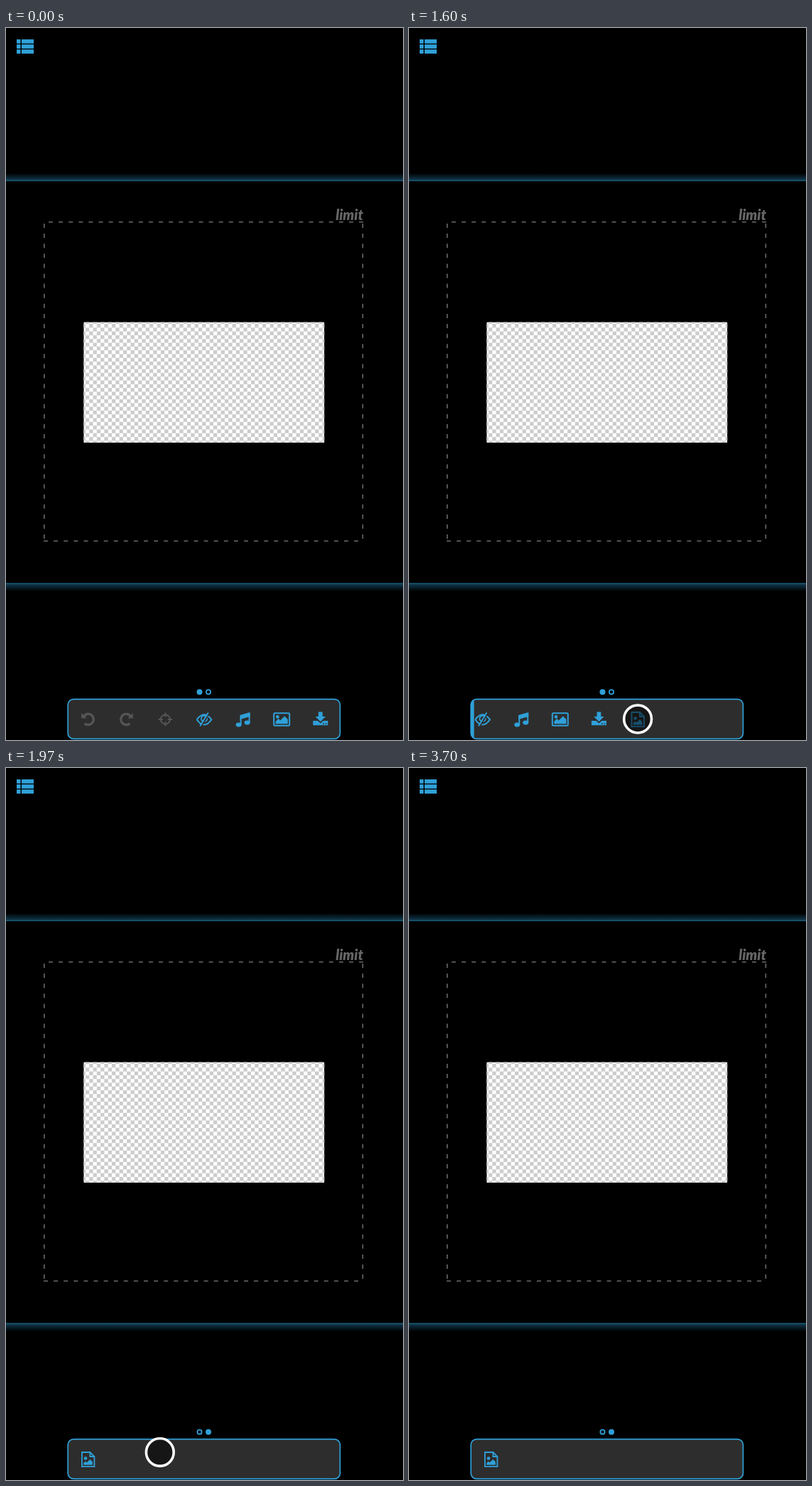
An HTML page with a canvas that plays this animation: 559x1001 px, repeating every 4.2 s.

```html
<!DOCTYPE html>
<html lang="en">
<head>
<meta charset="utf-8">
<title>Save toolbar</title>
<style>
html, body { margin: 0; width: 100%; height: 100%; overflow: hidden; background: #000; }
canvas { display: block; }
</style>
</head>
<body>
<canvas id="stage" width="559" height="1001"></canvas>
<script>
const ctx = document.getElementById('stage').getContext('2d');
const BLUE = '#2fa0d8', GRAY = '#555', BAR = '#2d2d2d';
const LOOP = 4200, PAGE = 382, ICON_GAP = 54.6;
const clamp = v => Math.max(0, Math.min(1, v));

function rect(color, x, y, w, h) {
  ctx.fillStyle = color;
  ctx.fillRect(x, y, w, h);
}
function poly(points) {
  ctx.beginPath();
  for (let i = 0; i < points.length; i += 2) ctx.lineTo(points[i], points[i + 1]);
  ctx.closePath();
  ctx.fill();
}
function line(x1, y1, x2, y2) {
  ctx.beginPath();
  ctx.moveTo(x1, y1);
  ctx.lineTo(x2, y2);
  ctx.stroke();
}
function circle(x, y, r, filled) {
  ctx.beginPath();
  ctx.arc(x, y, r, 0, 7);
  filled ? ctx.fill() : ctx.stroke();
}

// Icons are drawn around their own centre.
function undo() {
  ctx.lineWidth = 3.4;
  ctx.beginPath();
  ctx.arc(0.5, 0, 7.6, -2.5, 2.3);
  ctx.stroke();
  poly([-9, -9, -9, -1.5, -1.5, -1.5]);
}
function redo() {
  ctx.scale(-1, 1);
  undo();
}
function target() {
  circle(0, 0, 6.6);
  for (let i = 0; i < 4; i++) {
    line(3.5, 0, 9.6, 0);
    ctx.rotate(Math.PI / 2);
  }
}
function hiddenEye() {
  ctx.beginPath();
  ctx.moveTo(-10.3, 0.3);
  ctx.quadraticCurveTo(0, -14, 10.3, 0.3);
  ctx.quadraticCurveTo(0, 14.6, -10.3, 0.3);
  ctx.stroke();
  ctx.lineWidth = 1.7;
  circle(0, -1, 4.2);
  ctx.strokeStyle = BAR;
  ctx.lineWidth = 1.6;
  line(7.4, -8.6, -4, 10);
  ctx.strokeStyle = BLUE;
  ctx.lineWidth = 1.8;
  line(5.8, -9.5, -5.8, 9.5);
}
function music() {
  poly([-4, -6, 10, -10, 10, -4, -4, 0]);
  line(-3, -5, -3, 8);
  line(9, -8, 9, 5);
  for (const [x, y] of [[-6, 7.5], [6, 4.5]]) {
    ctx.beginPath();
    ctx.ellipse(x, y, 4, 3.1, 0, 0, 7);
    ctx.fill();
  }
}
function picture() {
  ctx.beginPath();
  ctx.roundRect(-11, -8.8, 22, 17.6, 1.5);
  ctx.stroke();
  circle(-5.8, -3.6, 2.3, true);
  poly([-8.6, 6.2, -8.6, 3, -4.6, -1, -2, 1.6, 4, -4.6, 8.6, 0, 8.6, 6.2]);
}
function download() {
  poly([-2.9, -10.5, 2.9, -10.5, 2.9, -4, 7.2, -4, 0, 3.3, -7.2, -4, -2.9, -4]);
  poly([-10.5, 2, -4, 2, 0, 5.6, 4, 2, 10.5, 2, 10.5, 8.3, -10.5, 8.3]);
  rect(BAR, 3.5, 5.4, 1.6, 1.6);
  rect(BAR, 7, 5.4, 1.6, 1.6);
}
function pictureFile() {
  ctx.lineWidth = 1.8;
  ctx.beginPath();
  ctx.moveTo(-8.5, -10);
  for (const [x, y] of [[3, -10], [9, -4], [9, 10.2], [-8.5, 10.2]]) ctx.lineTo(x, y);
  ctx.closePath();
  ctx.moveTo(3, -10);
  ctx.lineTo(3, -4);
  ctx.lineTo(9, -4);
  ctx.stroke();
  circle(-3.4, -1.5, 2.3, true);
  poly([-6.2, 7.8, -6.2, 5.2, -3.6, 2.8, -1.8, 4.4, 3, 0, 6.4, 3.4, 6.4, 7.8]);
}
const icons = [undo, redo, target, hiddenEye, music, picture, download, pictureFile];

function glow(edge, outer) {
  const g = ctx.createLinearGradient(0, outer, 0, edge);
  g.addColorStop(0, 'rgba(35,120,165,0)');
  g.addColorStop(1, 'rgba(35,120,165,.5)');
  rect(g, 0, Math.min(edge, outer), 559, Math.abs(edge - outer));
  rect('#1c5f7d', 0, edge - 0.7, 559, 1.4);
}

function drawCheckerboard(x, y, w, h) {
  const cell = w / 64;
  ctx.save();
  ctx.beginPath();
  ctx.rect(x, y, w, h);
  ctx.clip();
  rect('#fff', x, y, w, h);
  for (let row = 0; row <= 32; row++)
    for (let col = (row + 1) % 2; col <= 64; col += 2)
      rect('#ccc', x + (col - 0.5) * cell, y + (row - 0.5) * cell, cell, cell);
  ctx.restore();
}

function drawCanvasArea() {
  rect('#000', 0, 0, 559, 1001);
  for (let row = 0; row < 3; row++) {
    rect(BLUE, 15, 16 + row * 7.1, 5.5, 5.8);
    rect(BLUE, 22, 16 + row * 7.1, 17, 5.8);
  }
  glow(214.6, 204);
  glow(781, 792);

  ctx.strokeStyle = '#696969';
  ctx.lineWidth = 1.6;
  ctx.setLineDash([6, 8.1]);
  line(60, 272.7, 503, 272.7);
  line(53, 721.2, 503, 721.2);
  line(53.8, 275, 53.8, 721);
  line(502.3, 275, 502.3, 721);
  ctx.setLineDash([]);

  ctx.font = 'italic 900 20px Lato, sans-serif';
  ctx.letterSpacing = '0px';
  ctx.textAlign = 'right';
  ctx.fillStyle = '#666';
  ctx.fillText('limit', 503, 270);

  drawCheckerboard(109.3, 413.4, 339, 169.5);
}

function drawToolbar(scroll) {
  const page = scroll > PAGE / 2 ? 1 : 0;
  ctx.strokeStyle = ctx.fillStyle = BLUE;
  ctx.lineWidth = 1.8;
  circle(272.5, 933.4, page ? 3.1 : 4, !page);
  circle(285, 933.4, page ? 4 : 3.1, page);

  ctx.save();
  ctx.beginPath();
  ctx.roundRect(87.2, 943.6, 383.2, 55.8, 8);
  ctx.fillStyle = BAR;
  ctx.fill();
  ctx.clip();
  icons.forEach((icon, i) => {
    ctx.save();
    ctx.translate(115.2 + i * ICON_GAP - scroll, 972);
    ctx.strokeStyle = ctx.fillStyle = i < 3 ? GRAY : BLUE;
    ctx.lineWidth = 2;
    icon();
    ctx.restore();
  });
  if (scroll > 0 && scroll < PAGE) rect(BLUE, 87, 943, 4.6, 57);
  ctx.restore();

  ctx.beginPath();
  ctx.roundRect(87.2, 943.6, 383.2, 55.8, 8);
  ctx.strokeStyle = BLUE;
  ctx.lineWidth = 1.7;
  ctx.stroke();
}

function drawTouch(x, y) {
  ctx.fillStyle = 'rgba(0,0,0,.5)';
  circle(x, y, 19.4, true);
  ctx.strokeStyle = '#fff';
  ctx.lineWidth = 3.6;
  circle(x, y, 19.4);
}

function captionFont(size) {
  ctx.font = `900 condensed ${size}px Impact, "Roboto Condensed", Roboto, sans-serif`;
  ctx.letterSpacing = -size / 24 + 'px';
}
captionFont(56);
const captionSize = Math.min(56, 56 * 235 / ctx.measureText('Save project').width);

function caption(text, y) {
  captionFont(captionSize);
  ctx.textAlign = 'center';
  ctx.fillStyle = ctx.strokeStyle = '#fff';
  ctx.lineWidth = 1.6;
  ctx.lineJoin = 'round';
  ctx.fillText(text, 276, y);
  ctx.strokeText(text, 276, y);
  ctx.lineJoin = 'miter';
}

function draw(now) {
  const t = now % LOOP;
  drawCanvasArea();
  drawToolbar(PAGE * (1 - (1 - clamp((t - 1480) / 360)) ** 1.5));

  if (t >= 280 && t < 1350) {
    caption('Save project', 863.5);
    caption('Load later', 918.5);
    drawTouch(440, 972);
  } else if (t >= 1350 && t < 2250) {
    const swipe = clamp((t - 1480) / 700);
    drawTouch(378 - 177 * (1 - (1 - swipe) ** 2), 973 - 18.5 * swipe ** 1.45);
  } else if (t >= 2680 && t < 3700) {
    caption('Save as PNG', 919.5);
    drawTouch(113, 970);
  }
}

const start = performance.now();
function tick() {
  draw(performance.now() - start);
  requestAnimationFrame(tick);
}
tick();
</script>
</body>
</html>
```
